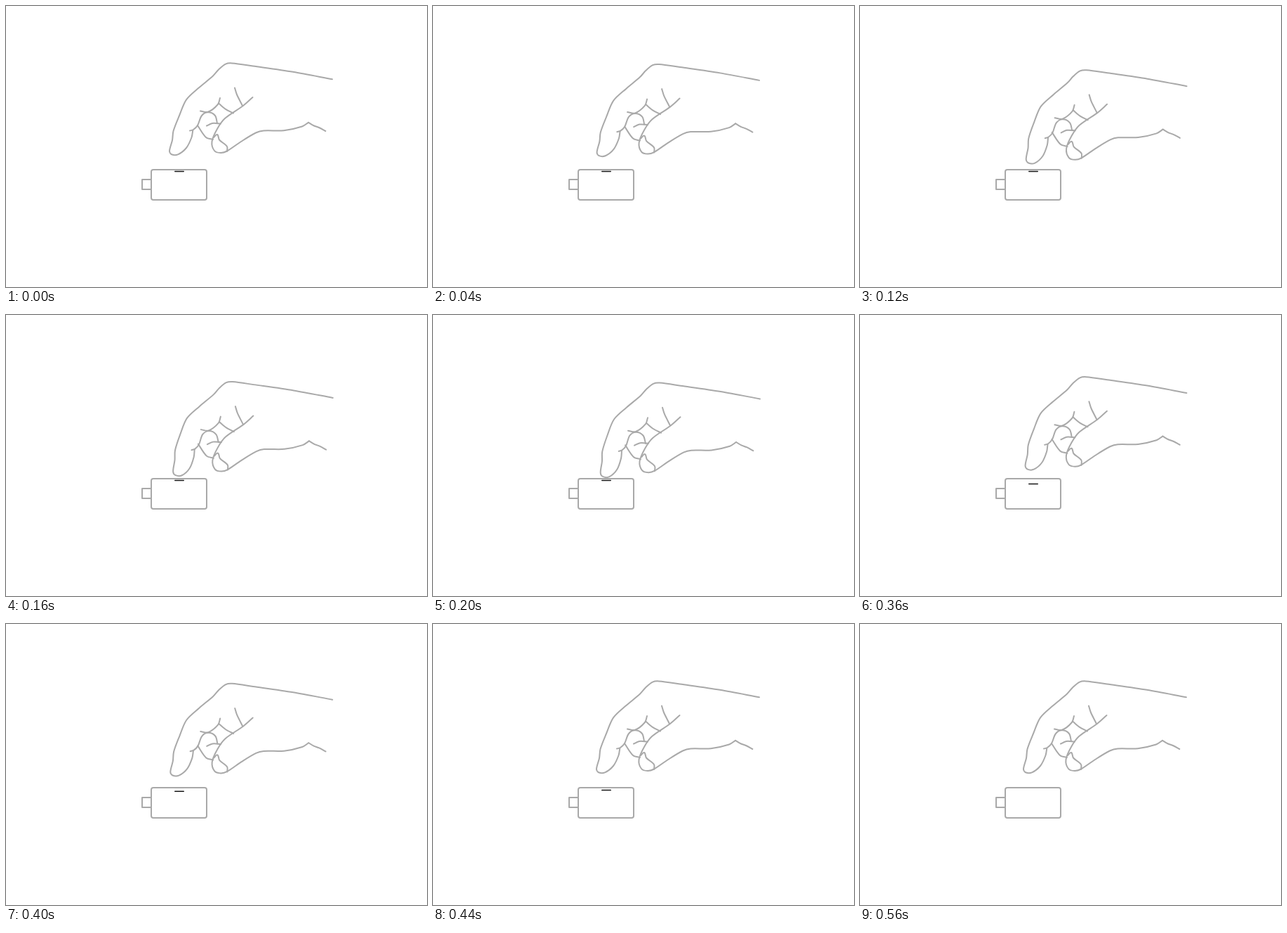
Animation, 600 px wide and 400 px high, one loop 1 s. Source, as an HTML page with a canvas:

```html
<!DOCTYPE html>
<html lang="en">
<head>
<meta charset="utf-8">
<title>Press</title>
<style>
html, body { margin: 0; width: 100%; height: 100%; overflow: hidden; background: #fff; }
canvas { display: block; width: 600px; height: 400px; }
</style>
</head>
<body>
<canvas id="stage" width="600" height="400"></canvas>
<script>
const ctx = document.getElementById('stage').getContext('2d');
const LOOP = 1000, STEP = 40;
const GRAY = '#a9a9a9', INK = '#151515';
const REACH = 15.2; // how far the hand travels down

const span = (t, from, to) => Math.max(0, Math.min(1, (t - from) / (to - from)));
const smooth = u => u * u * (3 - 2 * u);

// 0 = hand raised, 1 = finger on the button
const pressAt = t => smooth(span(t, 0, 200)) - span(t, 240, 440) ** 1.15;

// The bar dips after the press, then slides up behind the top edge.
const barAt = t =>
  235.5 + 5 * span(t, 240, 360) - 7.5 * (1 - (1 - span(t, 360, 560)) ** 1.5);

// Smooth stroke through x, y pairs; handles follow the neighbours' direction.
function curve(...p) {
  const last = p.length / 2 - 1;
  const pt = i => {
    const k = 2 * Math.max(0, Math.min(last, i));
    return [p[k], p[k + 1]];
  };
  const tangent = i => {
    const [ax, ay] = pt(i - 1), [bx, by] = pt(i + 1);
    const len = Math.hypot(bx - ax, by - ay);
    return [(bx - ax) / len, (by - ay) / len];
  };
  ctx.beginPath();
  ctx.moveTo(p[0], p[1]);
  for (let i = 0; i < last; i++) {
    const [ax, ay] = pt(i), [bx, by] = pt(i + 1);
    const [ux, uy] = tangent(i), [vx, vy] = tangent(i + 1);
    const h = 0.3 * Math.hypot(bx - ax, by - ay);
    ctx.bezierCurveTo(ax + ux * h, ay + uy * h, bx - vx * h, by - vy * h, bx, by);
  }
  ctx.stroke();
}

// Straightens the index finger: the shift grows from knuckle to tip.
function bend(press, ...p) {
  return p.map((v, i) => {
    const y = p[i | 1];
    const s = press * span(y, 134, 212) ** 2;
    return v + s * (i % 2 ? 3.8 : 5.5);
  });
}

function drawHand(press) {
  ctx.save();
  ctx.translate(press, REACH * press);

  // Back of the hand and index finger
  curve(465, 104.3, 409, 93.8, 352, 85.5, 322, 81.4, 313, 82.6, 303, 90.5,
    295, 99.5, 275, 116.3, 257, 133.3,
    ...bend(press, 247, 156, 238.5, 178, 237, 191, 233, 206.5, 236, 211.2,
      245, 211.3, 257, 202, 264.5, 187, 266.3, 177));

  // Folded fingers
  curve(...bend(press, 262, 177.5, 267, 176, 273, 170, 279, 156, 288, 151.3, 298, 156, 301, 167));
  curve(277, 149.5, 288, 150.8, 302, 140, 305, 131);
  curve(303, 138.5, 313, 146.8, 324, 152.5);
  curve(326, 116.5, 329, 126, 337, 142);
  curve(286, 170.5, 294, 167, 306, 167.5);
  curve(273, 170, 285, 187, 295, 190);

  // Thumb, palm and wrist
  curve(351.5, 130, 338, 142, 312, 160, 301, 175, 293.5, 193, 297, 206, 306, 209,
    315, 206.5, 335, 193, 356, 180.5, 367, 177.5, 396, 177.2, 422, 171.5, 431, 165.8);
  curve(431, 165.8, 439, 170.5, 446, 173, 455.3, 178);
  curve(296, 187, 301, 183, 304, 190.5, 315, 200, 315, 207);
  ctx.restore();
}

function drawDevice(barY) {
  if (barY > 233) {
    ctx.fillStyle = INK;
    ctx.beginPath();
    ctx.roundRect(240, barY - 0.75, 14, 1.5, 0.75);
    ctx.fill();
  }
  ctx.beginPath();
  ctx.roundRect(207, 233, 79, 43, 3);
  ctx.rect(194, 247, 13, 14);
  ctx.stroke();
}

function draw(now) {
  const t = Math.floor((now % LOOP) / STEP) * STEP;
  ctx.clearRect(0, 0, 600, 400);
  drawDevice(barAt(t));
  drawHand(pressAt(t));
}

ctx.lineCap = ctx.lineJoin = 'round';
ctx.strokeStyle = GRAY;
ctx.lineWidth = 2;

const start = performance.now();
function tick() {
  draw(performance.now() - start);
  requestAnimationFrame(tick);
}
tick();
</script>
</body>
</html>
```
